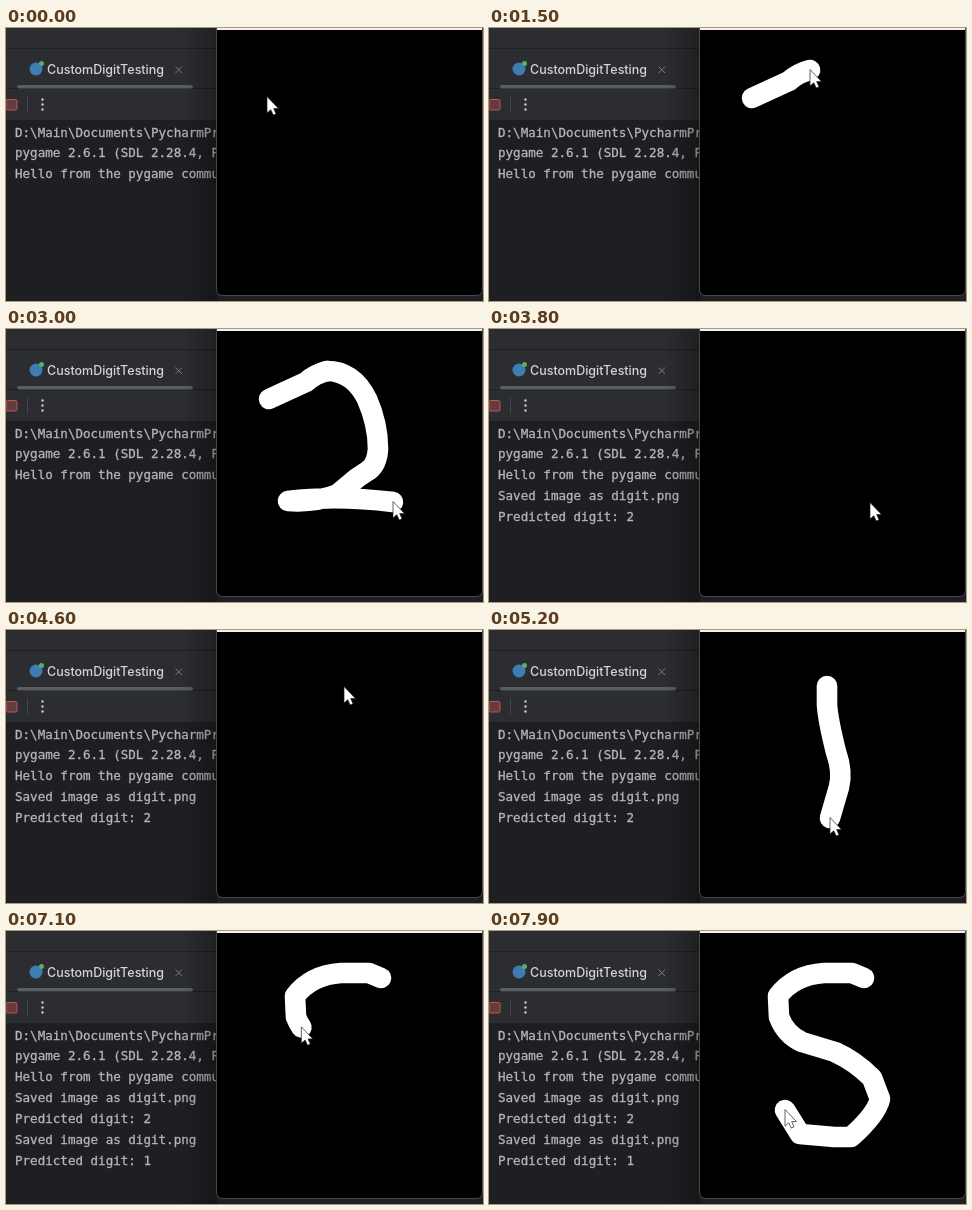
Animation of 477 by 273 pixels, one loop 8 s. Source, as an HTML page:

```html
<!DOCTYPE html>
<html lang="en">
<head>
<meta charset="utf-8">
<title>Digit drawing</title>
<style>
  html, body { margin: 0; width: 100%; height: 100%; overflow: hidden; background: #1e1f22; }
  svg { display: block; }
  text { white-space: pre; }
  #log { font: 12.55px "DejaVu Sans Mono", monospace; fill: #b4b6bb; stroke: #b4b6bb; stroke-width: .3; }
  .tab { font: 500 12.5px Inter, sans-serif; fill: #d3d5d9; }
  #moves { fill: none; stroke-width: 20.6; stroke-linecap: round; stroke-linejoin: round; }
  .pen { stroke: #fff; }
</style>
</head>
<body>
<svg width="477" height="273" viewBox="0 0 477 273">
  <linearGradient id="shade">
    <stop stop-opacity="0"/>
    <stop offset="1" stop-opacity=".3"/>
  </linearGradient>
  <rect width="477" height="273" fill="#1e1f22"/>
  <rect width="477" height="92" fill="#2b2d30"/>
  <path d="M0 20.5H477M0 60.5H477" stroke="#1e1f22"/>
  <rect x="11" y="57" width="176" height="3.5" rx="1.7" fill="#5a5d63"/>

  <circle cx="30" cy="41" r="6.5" fill="#3d7eb2"/>
  <circle cx="35.5" cy="35.5" r="2.5" fill="#5fad65"/>
  <text class="tab" x="41" y="45.5">CustomDigitTesting</text>
  <path d="M169.5 38.5l6.5 6.5m0-6.5l-6.5 6.5" stroke="#777a81"/>

  <rect x="0" y="71.5" width="11" height="10.5" rx="1.5" fill="#653b3c" stroke="#bd5655"/>
  <path d="M21.5 68V85" stroke="#43454a"/>
  <path d="M36.5 71.5v0m0 5v0m0 5v0" stroke="#ced0d6" stroke-width="2.4" stroke-linecap="round"/>

  <g id="log"></g>

  <rect x="175" width="36" height="273" fill="url(#shade)"/>
  <path d="M210.5 0V261q0 6.5 6.5 6.5H470q6.5 0 6.5-6.5V0" fill="#000" stroke="#47484b"/>
  <rect x="211" width="265" height="2" fill="#f3f0f0"/>
  <g id="moves"></g>
  <path id="cursor" d="M0-.5V16L3.8 12.7L6.2 18L9 16.8L6.7 11.6H11.5Z" fill="#fff" stroke="#222" stroke-width=".7"/>
</svg>
<script>
const LOOP = 8000, STEP = 100;

// The cursor follows each path at an even speed; a wipe time means the pen is down.
const moves = [
  { from: 0, to: 100, d: "M261 69L263 71" },
  { from: 200, to: 1000, d: "M263 71Q330 18 354 62T270 110Q200 112 201 88Q202 64 263 70" },
  { from: 1200, to: 1500, wipe: 3400, d: "M263 70L300 53Q309 45 321 42" },
  { from: 1500, to: 2100, wipe: 3400, d: "M321 42Q347 42 361 70Q372 95 372 120Q371 135 363 141" },
  { from: 2100, to: 2200, wipe: 3400, d: "M363 141L351 149 332 165" },
  { from: 2200, to: 3000, wipe: 3400, d: "M332 165Q309 174 282 172Q330 166 387 173" },
  { from: 3000, to: 3800, d: "M387 173Q390 185 381 174" },
  { from: 3900, to: 4600, d: "M381 174Q330 70 312 74Q316 60 338 57" },
  { from: 4700, to: 5200, wipe: 5700, d: "M338 56V75Q339 90 347 122Q354 142 350 157L341 188" },
  { from: 5200, to: 5700, d: "M341 188Q352 130 335 98" },
  { from: 5800, to: 6100, d: "M335 98V82" },
  { from: 6200, to: 6600, d: "M335 82L375 48" },
  { from: 6700, to: 7900, wipe: LOOP, d: "M375 47L363 42H335Q305 44 289 65L290 86Q297 104 313 111" +
    "L346 121Q366 130 383 147L391 168Q387 184 362 206H345L311 203 296 179" }
];

const lines = [
  [0, "D:\\Main\\Documents\\PycharmProjects"],
  [0, "pygame 2.6.1 (SDL 2.28.4, Python"],
  [0, "Hello from the pygame community."],
  [3600, "Saved image as digit.png"],
  [3700, "Predicted digit: 2"],
  [5900, "Saved image as digit.png"],
  [6000, "Predicted digit: 1"]
];

const get = id => document.getElementById(id);
const show = (el, on) => el.style.display = on ? "" : "none";

function add(parent, tag, attrs) {
  const el = document.createElementNS("http://www.w3.org/2000/svg", tag);
  for (const name in attrs) el.setAttribute(name, attrs[name]);
  get(parent).append(el);
  return el;
}

for (const move of moves) {
  move.path = add("moves", "path", { d: move.d, class: move.wipe ? "pen" : "" });
  move.length = move.path.getTotalLength();
}

const rows = lines.map(([start, words], i) => {
  const row = add("log", "text", { x: 9, y: 108.6 + i * 20.85 });
  row.textContent = words;
  return { row, start };
});

function draw(now) {
  const t = Math.floor(now % LOOP / STEP) * STEP;
  let tip;
  for (const { from, to, wipe, path, length } of moves) {
    const done = length * Math.min(1, Math.max(0, (t - from) / (to - from)));
    if (t >= from) tip = path.getPointAtLength(done);
    path.setAttribute("stroke-dasharray", `${done} ${length * 2}`);
    show(path, t > from && t < wipe);
  }
  get("cursor").setAttribute("transform", `translate(${tip.x} ${tip.y})`);
  for (const { row, start } of rows) show(row, t >= start);
  requestAnimationFrame(draw);
}
requestAnimationFrame(draw);
</script>
</body>
</html>
```
